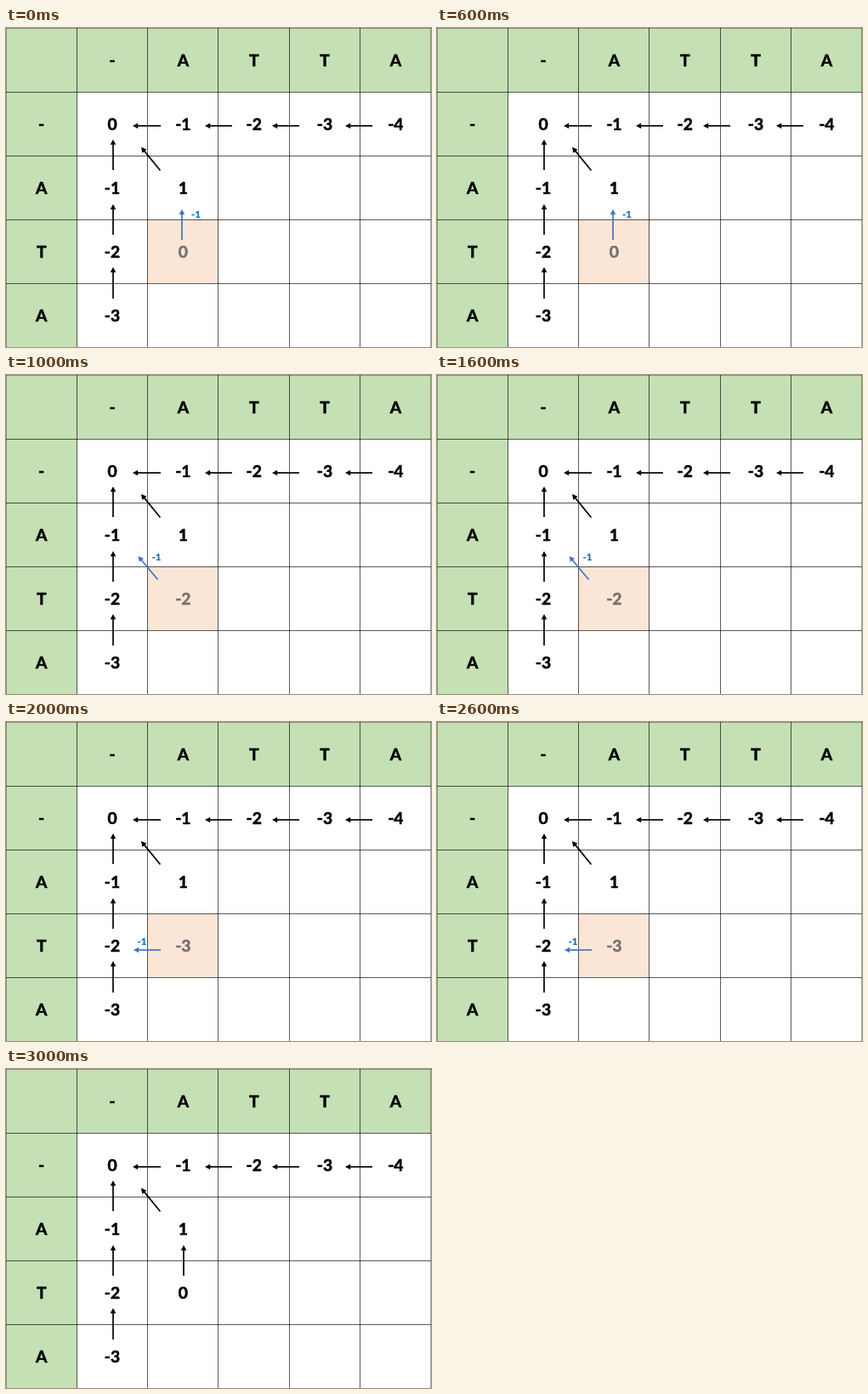
These frames come from a looping animation (500x375 px, 4000 ms). An HTML page:

```html
<!DOCTYPE html>
<html lang="en">
<head>
<meta charset="utf-8">
<title>Sequence alignment matrix</title>
<style>
  html, body { margin: 0; width: 100%; height: 100%; overflow: hidden; background: #fff; }
  svg { display: block; width: 500px; height: 375px; }
  text {
    font: bold 19.3px Lato, Carlito, sans-serif; text-anchor: middle;
    fill: currentColor; stroke: currentColor; stroke-width: .55px;
  }
  .small { font-size: 11.6px; color: #0070c0; stroke-width: .2px; }
</style>
</head>
<body>
<svg viewBox="0 0 500 375">
  <path fill="#c5e0b4" d="M0 0H500V75H83.5V375H0Z"/>
  <g id="stage"></g>
</svg>
<script>
const CELL_W = 500 / 6, CELL_H = 75;
const BLACK = '#000', BLUE = '#4472c4', GREY = '#767171';

const label = (s, x, y, attrs) => `<text x="${x}" y="${y}" ${attrs}>${s}</text>`;

const cell = (s, col, row, color = BLACK) =>
  label(s, (col + 0.5) * CELL_W, row * CELL_H + 45.4, `color="${color}"`);

// Line with a filled triangular head at (x2, y2)
function arrow([x1, y1, x2, y2], color = BLACK) {
  const angle = Math.atan2(y2 - y1, x2 - x1) * 180 / Math.PI;
  const len = Math.hypot(x2 - x1, y2 - y1);
  return `<g transform="translate(${x2} ${y2}) rotate(${angle})">
    <path d="M${-len} 0H-4" stroke="${color}" stroke-width="1.7"/>
    <path d="M0 0L-6.2 -3.3V3.3Z" fill="${color}"/></g>`;
}

// Outer lines lie on the stage edge, so half of each is cut off
function grid() {
  let d = 'M0 0H500V375M0 0V375';
  for (let i = 1; i < 6; i++) d += `M${Math.ceil(i * CELL_W) - 0.5} 0V375`;
  for (let j = 1; j < 5; j++) d += `M0 ${j * CELL_H + 0.5}H500`;
  return `<path d="${d}" fill="none" stroke="#000" stroke-opacity=".65"/>`;
}

const base = grid() +
  [...'-ATTA'].map((s, i) => cell(s, i + 1, 0)).join('') +
  [...'-ATA'].map((s, i) => cell(s, 0, i + 1)).join('') +
  [0, -1, -2, -3, -4].map((s, i) => cell(s, i + 1, 1)).join('') +
  [-1, -2, -3].map((s, i) => cell(s, 1, i + 2)).join('') +
  cell(1, 2, 2) +
  [[182, 149], [266, 234], [345, 313], [431, 399]]
    .map(([from, to]) => arrow([from, 115, to, 115])).join('') +
  [[167, 131], [243, 207], [318, 281]]
    .map(([from, to]) => arrow([126, from, 126, to])).join('') +
  arrow([181.5, 167.5, 159, 140]);

// Candidate score, its arrow and the place of its penalty
const candidates = [
  [0, [207, 249, 207, 213], 223.5, 223],
  [-2, [178.5, 240.5, 155.5, 213], 177, 218],
  [-3, [182, 268, 150, 268], 160, 262],
];

const steps = candidates.map(([score, line, x, y]) =>
  `<path fill="#fbe5d6" d="M166 225H250V300H166Z"/>` + base +
  cell(score, 2, 3, GREY) + arrow(line, BLUE) + label('-1', x, y, 'class="small"'));
steps.push(base + cell(0, 2, 3) + arrow([209, 243, 209, 207]));

const stage = document.getElementById('stage');
const start = performance.now();
let shown = -1;

function draw() {
  const step = Math.floor((performance.now() - start) / 1000) % steps.length;
  if (step !== shown) stage.innerHTML = steps[shown = step];
  requestAnimationFrame(draw);
}
draw();
</script>
</body>
</html>
```
